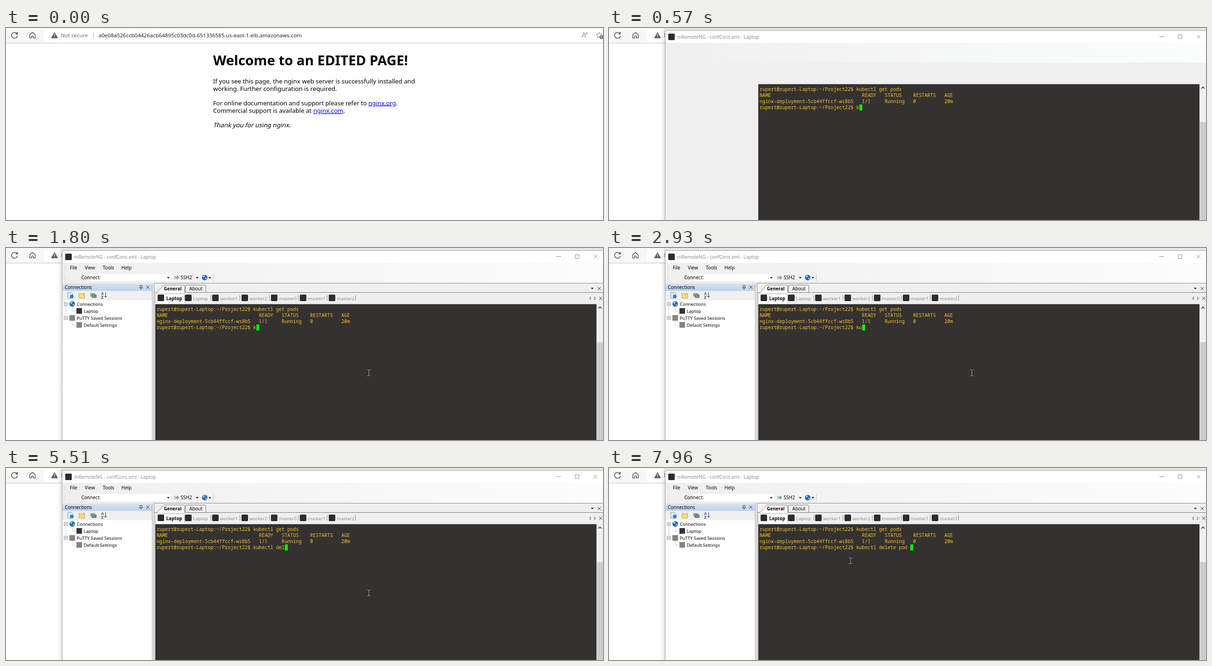
These frames come from a looping animation (1280 by 412 pixels, 8 s). An HTML page:

```html
<!DOCTYPE html>
<html lang="en">
<head>
<meta charset="utf-8">
<title>Terminal session</title>
<style>
html, body { margin: 0; width: 100%; height: 100%; overflow: hidden; background: #fff; }
svg { display: block; font-family: "Noto Sans", "Open Sans", sans-serif; }
.page { font-size: 13.27px; }
.support { font-size: 13.05px; }
.link { fill: #00e; text-decoration: underline; }
.ui { font-size: 10px; }
.tree { font-size: 9.5px; }
.tabs { font-size: 9.8px; }
.dim { fill: #8c8c8c; }
.bold { font-weight: 700; }
.term { font: 10.17px "Noto Sans Mono", "DejaVu Sans Mono", monospace; fill: #ffc125; white-space: pre; }
.line { fill: none; stroke: #333; }
</style>
</head>
<body>
<svg width="1280" height="412" viewBox="0 0 1280 412">
  <defs>
    <linearGradient id="bar"><stop stop-color="#efefef"/><stop offset="1" stop-color="#fbfdfd"/></linearGradient>
    <linearGradient id="caption" x2="0" y2="1"><stop stop-color="#d6e4f3"/><stop offset="1" stop-color="#bdd2ea"/></linearGradient>
    <linearGradient id="side"><stop stop-opacity="0"/><stop offset=".5" stop-opacity=".03"/><stop offset="1" stop-opacity=".12"/></linearGradient>
    <rect id="app" width="14" height="14" rx="2" fill="#2c2c2e"/>
    <rect id="session" width="12" height="12" fill="#85857a"/>
    <path id="down" d="M-3 -1.5h6l-3 3z"/>
    <path id="cross" class="line" d="M-3.5 -3.5l7 7m0 -7l-7 7"/>
    <g id="globe">
      <circle r="6" fill="#2c68b0"/>
      <path d="M-4 -3q3 -3 5 -1l-2 3 -2 1zM1 1l3 -1q1 3 -2 4z" fill="#a9d7e8"/>
    </g>
    <g id="box"><rect x="-3.5" y="-3.5" width="7" height="7" fill="#fff" stroke="#8a9aa8"/><path d="M-2 0h4" stroke="#345"/></g>
  </defs>

  <!-- browser -->
  <rect width="1280" height="32" fill="#f7f7f7"/>
  <path d="M1280 3H86q-5 0 -5 5v16q0 5 5 5H1280z" fill="#fff"/>
  <path d="M0 32.5H1280" stroke="#c8c8c8"/>
  <path d="M23.8 12.4A6.4 6.4 0 1 0 24.6 17M24.4 8.6v4.2h-4.2" class="line" stroke-width="1.3"/>
  <path d="M51 14.5l5.8 -5 5.8 5v7h-4v-4.5h-3.6v4.5h-4z" class="line" stroke-width="1.2" stroke-linejoin="round"/>
  <path d="M104 9.5l6.8 12H97.2z" fill="#5f5f5f" stroke="#5f5f5f" stroke-linejoin="round"/>
  <path d="M104 13v4.5m0 1.2v1.4" stroke="#fff" stroke-width="1.3"/>
  <text x="117.5" y="20" font-size="11.4" fill="#6b6b6b">Not secure</text>
  <path d="M187.5 9v14" stroke="#aaa"/>
  <text x="198.5" y="20" font-size="11.53" fill="#222">a0e08a526ccb04426acb64895c03dc0d-651336585.us-east-1.elb.amazonaws.com</text>
  <g fill="none" stroke="#777">
    <path d="M1234.5 20.5l4.500 -11 4.500 11m-7.500 -3.500h6M1242.500 10.500q1.500 1.500 0 4M1245 9q2.500 3 0 6.500"/>
    <path d="M1276 20.500l-4 -1.500 -4 2.500 .7 -4.500 -3.200 -3.200 4.500 -.7 2 -4 2 4 4.500 .7"/>
    <circle cx="1276.5" cy="19.5" r="3.8" fill="#666"/>
    <path d="M1274.500 19.500h4m-2 -2v4" stroke="#fff"/>
  </g>
  <g class="page">
    <text x="444" y="79.5" class="bold" font-size="29.26">Welcome to an EDITED PAGE!</text>
    <text x="444" y="118.5">If you see this page, the nginx web server is successfully installed and</text>
    <text x="444" y="135">working. Further configuration is required.</text>
    <g class="support">
      <text x="444" y="165.5">For online documentation and support please refer to <tspan x="777" class="link">nginx.org</tspan>.</text>
      <text x="444" y="182">Commercial support is available at <tspan x="659" class="link">nginx.com</tspan>.</text>
    </g>
    <text transform="translate(444 213) skewX(-14)">Thank you for using nginx.</text>
  </g>

  <!-- window frame -->
  <g data-at="500">
    <rect x="108" y="3" width="12" height="409" fill="url(#side)"/>
    <rect x="118" width="1162" height="5" fill="#e6e6e6"/>
    <rect x="120" y="5" width="1160" height="407" fill="#efefef"/>
    <rect x="120" y="5" width="1160" height="27" fill="#fff"/>
    <rect x="121" y="32" width="1159" height="42.5" fill="url(#bar)"/>
    <path d="M120.500 412V5.500H1280" fill="none" stroke="#a2a2a2"/>
    <use href="#app" x="127" y="12"/>
    <text x="146" y="23" font-size="10.1" fill="#8c8c8c">mRemoteNG - confCons.xml - Laptop</text>
    <path d="M1180 18.500h10M1220.500 14.500h8v8h-8zM1260 14.500l8 8m0 -8l-8 8" fill="none" stroke="#888"/>
  </g>

  <!-- menu, toolbar and tabs -->
  <g data-at="630" class="ui">
    <path d="M126.500 38v10M126.500 58v11" stroke="#aaa" stroke-dasharray="1 2"/>
    <text x="137" y="46">File</text>
    <text x="169" y="46">View</text>
    <text x="207.5" y="46">Tools</text>
    <text x="247.5" y="46">Help</text>
    <rect x="180" y="56" width="174" height="15" fill="#fff"/>
    <text x="161.5" y="67">Connect:</text>
    <use href="#down" x="348" y="64"/>
    <path d="M361.500 60v7m2 -7v7M365 62h2v-2.500l4 4 -4 4v-2.500h-2z" fill="#8dbb8d" stroke="#6e8e6e" stroke-width=".8"/>
    <text x="374.5" y="67">SSH2</text>
    <use href="#down" x="410" y="64"/>
    <use href="#globe" x="426" y="63.5"/>
    <use href="#down" x="437" y="64"/>
    <path d="M444.500 56v16" stroke="#c4c4c4"/>

    <path d="M317.500 412V75.500H1280" fill="none" stroke="#8a8a8a"/>
    <path d="M318 95.500h6l13 -14q2 -2 4 -2h40q2 0 2 2v14H1280" fill="#fff" stroke="#777"/>
    <path d="M384.500 95v-14q0 -1.500 2 -1.500h40q2 0 2 2v14" fill="none" stroke="#777"/>
    <text x="338.5" y="91" class="bold" font-size="9.7">General</text>
    <text x="393" y="91">About</text>
    <use href="#down" x="1257" y="87"/>
    <use href="#cross" x="1272" y="87"/>
    <path d="M1253.500 104.500v7l-3.500 -3.500zM1261.500 104.500v7l3.500 -3.500z" fill="none" stroke="#777"/>
    <use href="#cross" x="1275" y="108"/>
    <rect x="320" y="98" width="63" height="22" fill="#fff"/>
    <path d="M320.500 119V98.500h62.500v20" fill="none" stroke="#bbb"/>
    <g id="tabs" class="tabs"></g>
  </g>

  <!-- connections panel -->
  <g data-at="700" class="ui">
    <rect x="121" y="76" width="192" height="16" fill="url(#caption)"/>
    <text x="126" y="87.5">Connections</text>
    <path d="M287.500 80v5m4 -5v5m-4 -4.500h4m-6 5h8m-4 0v4" class="line"/>
    <use href="#cross" x="304" y="84"/>
    <rect x="121" y="112" width="192" height="300" fill="#fff"/>
    <path d="M313.500 76V412" stroke="#a0a0a0"/>
  </g>
  <g data-at="760" class="tree">
    <path d="M132.500 95.500h8l3 3v9h-11z" fill="#e8f2fb" stroke="#6d8fb3"/>
    <circle cx="141" cy="104" r="4" fill="#3a7cc0"/>
    <path d="M156.500 107.500v-10h5l1 2h6v8z" fill="#f5dc83" stroke="#c0a040"/>
    <circle cx="167" cy="98" r="2" fill="#f0c020"/>
    <path d="M181.500 97.500h9v6h-9z" fill="#9db79d" stroke="#6d8570"/>
    <path d="M184.500 100.500h9v6h-9z" fill="#6f9677" stroke="#4f6d55"/>
    <text x="204" y="101" font-size="8" class="bold" fill="#2a5db0">A</text>
    <text x="204" y="109" font-size="8" class="bold" fill="#444">Z</text>
    <path d="M213.500 95v11m-2.500 -3l2.500 3 2.500 -3" class="line"/>

    <path d="M128.500 120v30m0 -30h8m-8 30h8M142.500 126v9.500h7M142.500 156v9.500h7" fill="none" stroke="#999" stroke-dasharray="1 1"/>
    <use href="#box" x="128" y="120"/>
    <use href="#box" x="128" y="150"/>
    <use href="#globe" x="142" y="120"/>
    <rect x="151" y="129" width="12" height="12" fill="#3a3038"/>
    <use href="#session" x="136" y="144"/>
    <use href="#session" x="151" y="159"/>
    <text x="152" y="124">Connections</text>
    <text x="166.5" y="139">Laptop</text>
    <text x="151.5" y="154">PuTTY Saved Sessions</text>
    <text x="166.5" y="169">Default Settings</text>
  </g>

  <!-- terminal -->
  <g data-at="570">
    <rect x="320" y="120.5" width="946" height="292" fill="#333231"/>
    <rect x="1266" y="120.5" width="14" height="292" fill="#f0f0f0"/>
    <rect x="1267" y="202" width="13" height="210" fill="#cdcdcd"/>
    <path d="M1270 130l3.500 -3.500 3.500 3.500" class="line" stroke-width="1.6"/>
    <g class="term" id="term"></g>
    <rect id="caret" y="164" width="6" height="13" fill="#0f0"/>
  </g>
  <g id="mouse" fill="none">
    <path id="beam" d="M-3.500 -6.500h2.500l1 1 1 -1h2.500M0 -6v12M-3.500 6.500h2.500l1 -1 1 1h2.500" stroke="#111" stroke-width="3"/>
    <path d="M-3.500 -6.500h2.500l1 1 1 -1h2.500M0 -6v12M-3.500 6.500h2.500l1 -1 1 1h2.500" stroke="#e8e8e8"/>
  </g>
</svg>
<script>
const LOOP = 8000, CELL = 6.102, LEFT = 323;
const PROMPT = 'rupert@rupert-Laptop:~/Project22$ ';
const COMMAND = 'kubectl delete pod ';
// time of each keystroke after the first letter
const KEYS = [2930, 3590, 3790, 3990, 4650, 4780, 4980, 5180, 5380, 5510,
  5640, 5740, 5840, 6110, 6240, 6380, 6440, 7630];
// pointer stops: time, x, y
const STOPS = [[1260, 792, 392], [1460, 788, 366], [1545, 779, 322], [1630, 772, 284],
  [1715, 771, 265], [1800, 778, 268], [7700, 738, 260], [7790, 640, 236],
  [7880, 555, 211], [7960, 518, 199]];

const $ = id => document.getElementById(id);
const stages = [...document.querySelectorAll('[data-at]')];

function add(parent, tag, attrs, text = '') {
  const el = document.createElementNS('http://www.w3.org/2000/svg', tag);
  for (const key in attrs) el.setAttribute(key, attrs[key]);
  el.textContent = text;
  return parent.appendChild(el);
}

['Laptop', 'Laptop', 'worker1', 'worker2', 'master0', 'master1', 'master2'].forEach((name, i) => {
  const x = [324, 383, 441, 504, 567, 629, 691][i];
  add($('tabs'), 'use', { href: '#app', x: x + 1, y: 100 });
  add($('tabs'), 'text', { x: x + (i ? 18 : 19.5), y: 112, class: i ? 'dim' : 'bold' }, name);
  const end = [383, 439, 501, 564, 626, 688, 749][i];
  add($('tabs'), 'path', { d: `M${end}.5 101v12`, stroke: '#888' });
});

const columns = (...cells) => cells.map((c, i) => c.padEnd([36, 8, 10, 11, 3][i])).join('');
const lines = [
  PROMPT + 'kubectl get pods',
  columns('NAME', 'READY', 'STATUS', 'RESTARTS', 'AGE'),
  columns('nginx-deployment-5cb44ffccf-ws8b5', '1/1', 'Running', '0', '20m'),
  PROMPT
].map((text, i) => {
  const el = add($('term'), 'text', { x: LEFT, y: 135 + i * 13 }, text);
  el.setAttributeNS('http://www.w3.org/XML/1998/namespace', 'xml:space', 'preserve');
  return el;
});

function draw() {
  const t = performance.now() % LOOP;
  for (const g of stages) g.style.display = t >= g.dataset.at ? '' : 'none';

  const typed = 1 + KEYS.filter(k => k <= t).length;
  lines[3].textContent = PROMPT + COMMAND.slice(0, typed);
  $('caret').setAttribute('x', Math.round(LEFT + CELL * (PROMPT.length + typed)));

  const stop = STOPS.filter(s => s[0] <= t).pop();
  $('mouse').style.display = stop ? '' : 'none';
  if (stop) $('mouse').setAttribute('transform', `translate(${stop[1]} ${stop[2]})`);
  requestAnimationFrame(draw);
}
draw();
</script>
</body>
</html>
```
